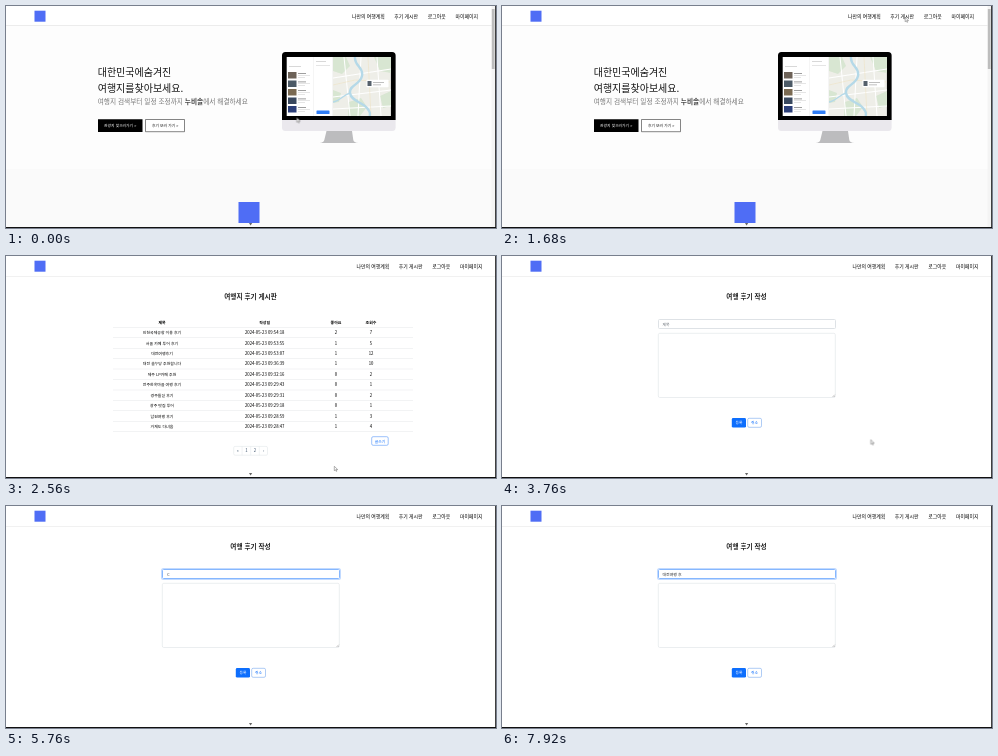
An HTML page that plays this animation: 490x222 px, repeating every 8 s.

```html
<!DOCTYPE html>
<html lang="ko">
<head>
<meta charset="utf-8">
<title>여행 후기</title>
<style>
html, body { margin: 0; width: 100%; height: 100%; overflow: hidden; background: #fff; }
svg { position: absolute; left: 0; top: 0; width: 490px; height: 222px; }
svg, .field { font-family: "Noto Sans CJK KR", "Noto Sans CJK", "Noto Sans", sans-serif; }
.home, .board, .write, .hover, .pointer { animation: 8s step-end infinite; }
.home { animation-name: home; }
.board { animation-name: board; }
.write { animation-name: write; }
@keyframes home { 0% { visibility: visible } 23%, 100% { visibility: hidden } }
@keyframes board { 0% { visibility: hidden } 23% { visibility: visible } 47%, 100% { visibility: hidden } }
@keyframes write { 0% { visibility: hidden } 47%, 100% { visibility: visible } }

.nav { font-size: 4.9px; font-weight: 500; fill: #000; }
.mid { text-anchor: middle; }
.title { font-size: 6.65px; font-weight: 700; fill: #222; text-anchor: middle; }
.small { font-size: 3.8px; font-weight: 500; text-anchor: middle; }
.table { font-size: 3.95px; font-weight: 500; fill: #000; text-anchor: middle; }
.num { font-size: 4.25px; }

.hover { animation-name: hover; }
@keyframes hover { 0% { fill: #fff; color: #0d6efd } 42% { fill: #0d6efd; color: #fff } 47%, 100% { fill: #fff; color: #0d6efd } }

.pointer { animation-name: move; animation-timing-function: ease-in-out; }
@keyframes move {
  0%, 1% { transform: translate(290.5px, 111.5px) }
  11%, 12% { transform: translate(340.5px, 8.5px) }
  22%, 25% { transform: translate(404px, 11px) }
  32% { transform: translate(328px, 210px) }
  36% { transform: translate(351px, 192px) }
  43%, 44% { transform: translate(369px, 184px) }
  45%, 100% { transform: translate(368.5px, 183.5px) }
}
.arrow { animation: arrow 8s step-end infinite; }
@keyframes arrow { 0% { opacity: 1 } 49%, 100% { opacity: 0 } }

.field {
  position: absolute; box-sizing: border-box; left: 156px; top: 63px; width: 177.5px; height: 10px;
  padding-left: 3.5px; border: .6px solid #dee2e6; border-radius: 1.5px;
  font-size: 3.95px; font-weight: 500; line-height: 9px; white-space: pre; color: #212529;
  animation: write 8s step-end infinite, focus 8s linear infinite;
}
@keyframes focus {
  0%, 53.5% { border-color: #dee2e6; box-shadow: 0 0 0 0 #0d6efd00 }
  56%, 99.99% { border-color: #86b7fe; box-shadow: 0 0 0 1px #0d6efd40 }
  100% { border-color: #dee2e6; box-shadow: 0 0 0 0 #0d6efd00 }
}
.field::before { content: "제목"; animation: type 8s step-end infinite; }
@keyframes type {
  0% { content: "제목"; color: #6c737a }
  55% { content: ""; color: #212529 }
  63% { content: "ㄷ"; color: #212529 }
  78% { content: "대"; color: #212529 }
  81% { content: "댖"; color: #212529 }
  87% { content: "대저"; color: #212529 }
  89% { content: "대전"; color: #212529 }
  91% { content: "대전ㅇ"; color: #212529 }
  93% { content: "대전여"; color: #212529 }
  95% { content: "대전여해"; color: #212529 }
  96% { content: "대전여행"; color: #212529 }
  97% { content: "대전여행 ㅎ"; color: #212529 }
  99%, 100% { content: "대전여행 후"; color: #212529 }
}
.field::after {
  content: ""; position: absolute; left: 3.3px; top: 2px; width: .5px; height: 5px;
  background: #222; animation: caret 8s step-end infinite;
}
@keyframes caret { 0% { opacity: 0 } 55% { opacity: 1 } 61%, 100% { opacity: 0 } }
</style>
</head>
<body>
<svg viewBox="0 0 490 222">
  <defs>
    <g id="nav" class="nav">
      <text x="350.5" y="11.6">나만의 여행계획</text>
      <text x="392.7" y="11.6">후기 게시판</text>
      <text x="426.3" y="11.6">로그아웃</text>
      <text x="453.9" y="11.6">마이페이지</text>
    </g>
    <clipPath id="mapClip"><path d="M327 51h58v59h-58z"/></clipPath>
  </defs>

  <g class="home">
    <path fill="#fdfdfd" d="M0 20h486v143H0z"/>
    <path fill="#fafafa" d="M0 163h486v58H0z"/>
    <path fill="#ececec" d="M0 19h486v1H0z"/>
    <use href="#nav" x="-4.5"/>
    <g font-size="10" font-weight="500" fill="#111">
      <text x="91.7" y="69.8">대한민국에숨겨진</text>
      <text x="91.7" y="85.8">여행지를찾아보세요.</text>
    </g>
    <text x="91.7" y="98.2" font-size="6.66" font-weight="300" fill="#777">여행지 검색부터 일정 조정까지 <tspan font-weight="700" fill="#444">누비솔</tspan>에서 해결하세요</text>
    <path d="M92 113.3h44.5v12.6H92z"/>
    <path fill="#fff" stroke="#333" stroke-width=".6" d="M139.5 113.5h39v12.2h-39z"/>
    <g class="small">
      <text x="114.2" y="121" fill="#fff">관광지 찾으러가기 &gt;</text>
      <text x="159.2" y="121" fill="#111">후기 보러 가기 &gt;</text>
    </g>

    <path fill="#bcbcbe" d="M320.5 125h25.5l1.3 9q.5 2.5 5 3h-39q4.5-.5 5-3z"/>
    <rect x="276" y="46" width="113.6" height="79" rx="3.5" fill="#eae8ed"/>
    <path d="M276 114V49.5a3.5 3.5 0 0 1 3.5-3.5h106.6a3.5 3.5 0 0 1 3.5 3.5V114z"/>
    <path fill="#fff" d="M280.7 51h104v59h-104z"/>
    <g id="list"></g>
    <path fill="#ececec" d="M307.5 51h.5v59h-.5zM326.5 51h.5v59h-.5z"/>
    <path fill="#ccc" d="M310 55h10v.8h-10zM310 59h14v.6h-14zM283 60h12v.8h-12z"/>
    <rect x="310.5" y="104.5" width="13" height="3.5" rx=".6" fill="#2f7df6"/>
    <g clip-path="url(#mapClip)" fill="none">
      <path fill="#eeeee8" d="M327 51h57.7v59H327z"/>
      <path fill="#d8e6d2" d="M327 51h13l4 9-8 8-9-3zM368 51h17v16l-11-2zM343 96l12-4 6 9-7 9h-12zM374 90l11-5v15l-8 2zM327 84l8 3-2 9-6 1z"/>
      <path stroke="#fff" d="M327 72l58-9M327 91l58-7M338 51l6 59M355 51l-3 59M371 51l4 59M327 103l58-3"/>
      <path stroke="#efe3c4" stroke-width=".6" d="M327 79l22-5 36 2M362 51l3 59"/>
      <path stroke="#b5d9e8" stroke-width="2.4" d="M349 51c-1 9 9 10 7 19s-13 9-12 17 12 9 17 15 2 5 3 9"/>
      <path stroke="#b5d9e8" stroke-width="1.4" d="M344 87c-7 2-10 8-17 9"/>
    </g>
    <rect x="360.5" y="73.8" width="22" height="7.4" rx=".6" fill="#fff"/>
    <path fill="#55606b" d="M361.5 75h4v5h-4z"/>
    <path fill="#aaa" d="M367 76h11v.8h-11zM367 78.5h8v.7h-8z"/>
    <rect x="232.5" y="196" width="21" height="21" fill="#4f6df5"/>
    <path fill="#f4f4f4" d="M485.5 0h3.5v221h-3.5z"/>
    <path fill="#bdbdbd" d="M485.8 3h2.8v60h-2.8z"/>
  </g>

  <g class="board">
    <path fill="#ececec" d="M0 20h489v.8H0z"/>
    <use href="#nav"/>
    <text class="title" x="244.5" y="42.9">여행지 후기 게시판</text>
    <g id="rows" class="table"></g>
    <g class="hover">
      <rect x="365.7" y="180.7" width="16.5" height="8.6" rx="1.4" stroke="#5a99f8" stroke-width=".6"/>
      <text class="small" x="374" y="186.5" style="fill:currentColor">글쓰기</text>
    </g>
    <rect x="227.7" y="190.4" width="33.8" height="8.8" rx="1.4" fill="#fff" stroke="#e3e7ea" stroke-width=".6"/>
    <path stroke="#e3e7ea" stroke-width=".5" d="M236.1 190.4v8.8M244.7 190.4v8.8M253.3 190.4v8.8"/>
    <g class="mid" font-size="4.3" font-weight="500" fill="#40566f">
      <text x="231.8" y="196.4">«</text><text x="240.4" y="196.4">1</text>
      <text x="249" y="196.4">2</text><text x="257.6" y="196.4">›</text>
    </g>
  </g>

  <g class="write">
    <path fill="#ececec" d="M0 20h489v.8H0z"/>
    <use href="#nav"/>
    <text class="title" x="244.5" y="42.9">여행 후기 작성</text>
    <rect x="156.3" y="77.3" width="177" height="64.2" rx="1.5" fill="#fff" stroke="#dee2e6" stroke-width=".6"/>
    <path stroke="#777" stroke-width=".4" d="M330.5 141l2.3-2.3M331.8 141l1-1"/>
    <rect x="229.8" y="162" width="14.2" height="9.6" rx="1.4" fill="#0d6efd"/>
    <rect x="245.7" y="162.3" width="13.8" height="9" rx="1.4" fill="#fff" stroke="#7aa9ee" stroke-width=".6"/>
    <g class="small">
      <text x="236.9" y="168.2" fill="#fff">등록</text>
      <text x="252.6" y="168.2" fill="#0d6efd">취소</text>
    </g>
  </g>

  <rect x="28.5" y="4.7" width="11" height="11" fill="#4f6df5"/>
  <path fill="#666" d="M243 217h3.2l-1.6 2.4z"/>
  <path fill="#111" d="M0 221h490v1H0zM489.2 0h.8v222h-.8z"/>
</svg>

<div class="field"></div>
<svg viewBox="0 0 490 222">
  <g class="pointer"><path class="arrow" fill="#fff" stroke="#555" stroke-width=".45" d="M.3.3v4.4l1.1-.9.8 1.6.7-.3-.7-1.6h1.5z"/></g>
</svg>

<script>
const posts = [
  ["인천국제공항 이용 후기", "54:18", 2, 7],
  ["서울 카페 투어 후기", "53:55", 1, 5],
  ["대전여행후기", "53:07", 1, 12],
  ["대전 솔누당 추천합니다", "36:39", 1, 10],
  ["제주 LP카페 추천", "32:16", 0, 2],
  ["전주한옥마을 여행 후기", "29:43", 0, 1],
  ["경주들길 후기", "29:31", 0, 2],
  ["광주 맛집 투어", "29:18", 0, 1],
  ["남원여행 후기", "28:59", 1, 3],
  ["거제도 다녀옴", "28:47", 1, 4]
];
const columns = [156, 258.7, 330, 365];
const line = y => `<path fill="#e6e8ea" d="M107 ${y}h300v.5H107z"/>`;
const row = (cells, y, bold) => cells.map((cell, i) =>
  `<text x="${columns[i]}" y="${y + 1.6}"${bold ? ' font-weight="700"' : i ? ' class="num"' : ""}>${cell}</text>`
).join("") + line(y + 5);

document.getElementById("rows").innerHTML =
  row(["제목", "작성일", "좋아요", "조회수"], 66, true) +
  posts.map(([name, time, likes, views], i) =>
    row([name, "2024-05-23 09:" + time, likes, views], 76.5 + i * 10.43)).join("");

const tones = ["#6d6258", "#4c5a66", "#7a6a52", "#39485e", "#2c3f78"];
document.getElementById("list").innerHTML = tones.map((tone, i) => {
  const y = 66 + i * 8.5;
  return `<path fill="${tone}" d="M282 ${y}h8.5v6.5H282z"/>
    <path fill="#888" d="M292 ${y + 1}h8v.8h-8z"/>
    <path fill="#ccc" d="M292 ${y + 3}h12v.6h-12zM292 ${y + 5}h7v.6h-7z"/>`;
}).join("");
</script>
</body>
</html>
```
